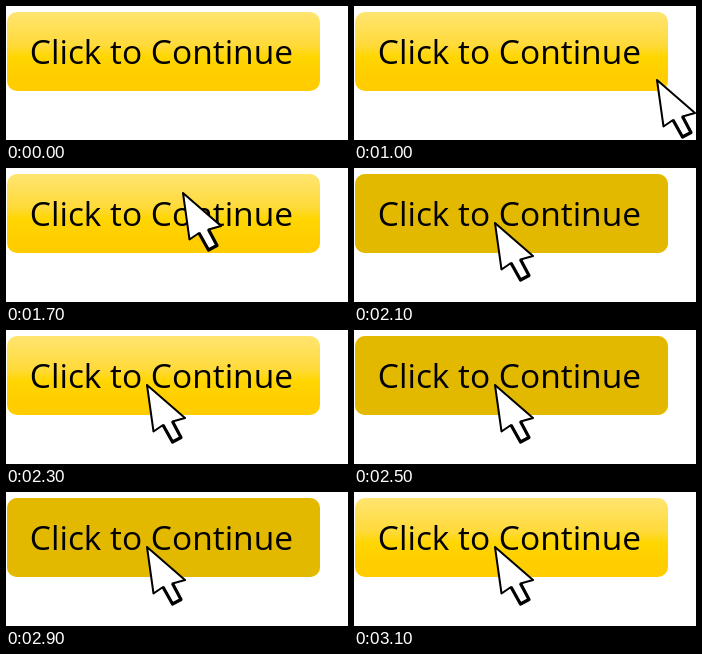
An HTML page for the animation above (4600 ms loop, 342 px wide and 134 px high).

```html
<!DOCTYPE html>
<html lang="en">
<head>
<meta charset="utf-8">
<title>Click to Continue</title>
<style>
  html, body { margin: 0; width: 100%; height: 100%; overflow: hidden; background: #fff; }
  svg { display: block; width: 342px; height: 134px; }
  text { font: 33.5px "Open Sans", "Noto Sans", sans-serif; fill: #000; }
</style>
</head>
<body>
<svg viewBox="0 0 342 134">
  <defs>
    <linearGradient id="gold" x1="0" y1="0" x2="0" y2="1">
      <stop offset="0" stop-color="#ffe571"/>
      <stop offset=".42" stop-color="#ffda3a"/>
      <stop offset=".57" stop-color="#ffd600"/>
      <stop offset=".8" stop-color="#ffce00"/>
      <stop offset="1" stop-color="#ffcc00"/>
    </linearGradient>
  </defs>
  <rect x="1" y="6" width="313" height="79" rx="10" fill="url(#gold)"/>
  <rect id="pressed" x="1" y="6" width="313" height="79" rx="10" fill="#e3b900" opacity="0"/>
  <text x="23.8" y="58">Click to Continue</text>
  <g id="cursor" opacity="0" stroke="#000" stroke-linejoin="round">
    <path d="M1 1L39 34L26.5 37.5L35 53.5L26.5 58L17 41L7.5 47.5Z" fill="#fff" stroke-width="2"/>
    <path d="M26.5 37.5L35 53.5L26.5 58L17 41" fill="none" stroke-width="3.2"/>
  </g>
</svg>
<script>
  const LOOP = 4600, STEP = 100;
  const el = id => document.getElementById(id);

  // Plays [time, style] rows as hard steps in an endless loop.
  function play(node, rows) {
    const frames = rows.map(([t, style]) => ({ offset: t / LOOP, easing: 'step-end', ...style }));
    frames.push({ ...frames[frames.length - 1], offset: 1 });
    node.animate(frames, { duration: LOOP, iterations: Infinity });
  }

  // Time and tip position at each bend of the pointer's path.
  const path = [[1000, 302, 73], [1500, 214, 1], [1700, 176, 24], [1900, 140, 54]];

  function place(t) {
    const i = Math.max(1, path.findIndex(p => p[0] >= t));
    const [t0, x0, y0] = path[i - 1], [t1, x1, y1] = path[i];
    const k = (t - t0) / (t1 - t0);
    const x = Math.round(x0 + (x1 - x0) * k), y = Math.round(y0 + (y1 - y0) * k);
    return { opacity: 1, transform: `translate(${x}px, ${y}px)` };
  }

  const moves = [[0, { opacity: 0, transform: 'translate(302px, 73px)' }]];
  for (let t = 1000; t <= 1900; t += STEP) moves.push([t, place(t)]);
  play(el('cursor'), moves);

  const blinks = [[0, { opacity: 0 }]];
  for (let i = 0; i < 6; i++) blinks.push([2100 + i * 200, { opacity: i % 2 ? 0 : 1 }]);
  play(el('pressed'), blinks);
</script>
</body>
</html>
```
